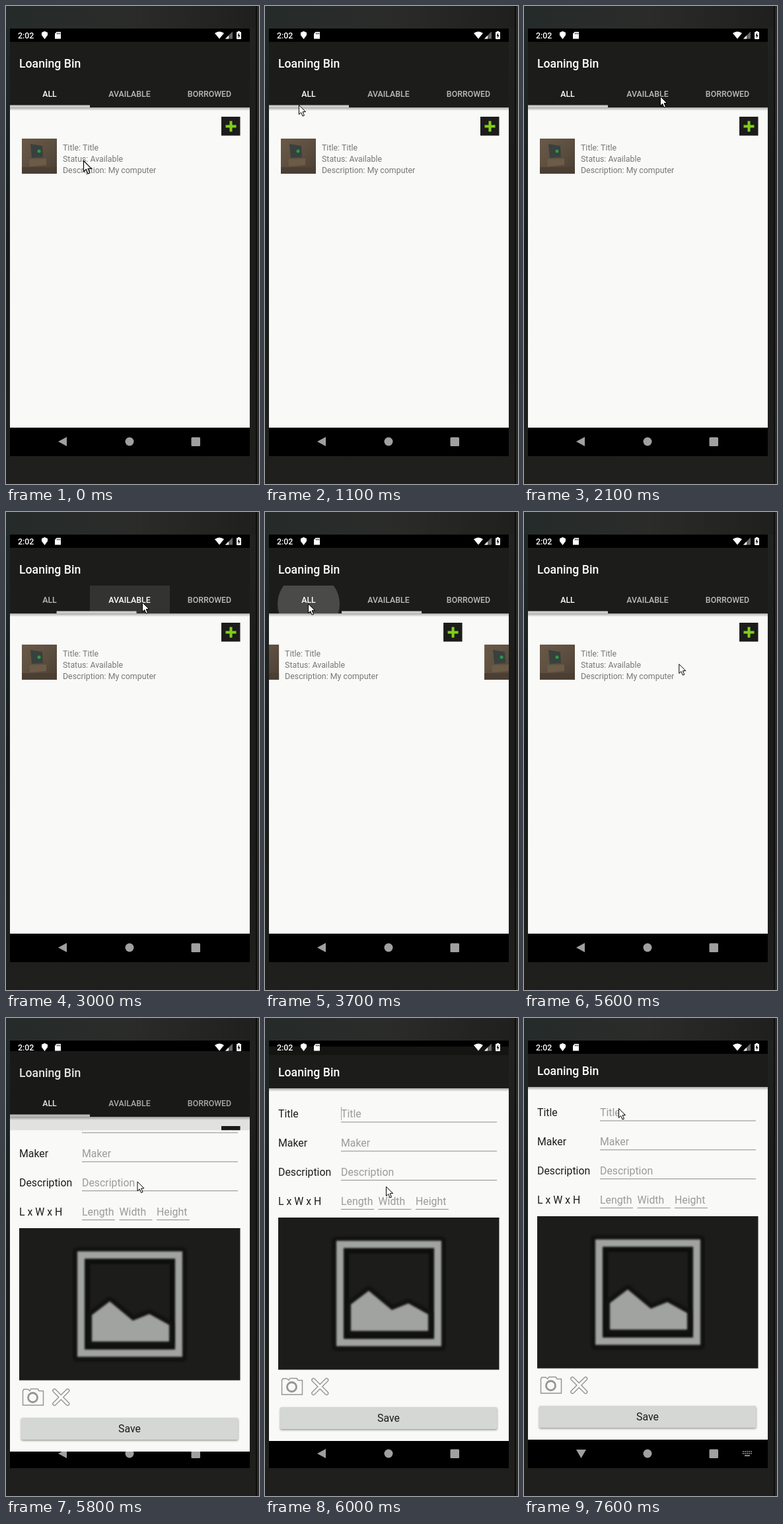
These frames come from a looping animation (383 by 721 pixels, 8 s). An HTML page with a canvas:

```html
<!DOCTYPE html>
<html lang="en">
<head>
<meta charset="utf-8">
<title>Item lending demo</title>
<style>
html, body { margin: 0; width: 100%; height: 100%; overflow: hidden; background: #1e1f1d; }
canvas { display: block; }
</style>
</head>
<body>
<canvas id="stage" width="383" height="721"></canvas>
<script>
const ctx = document.getElementById('stage').getContext('2d');
const LOOP = 8000, STEP = 100, PAGE = 364, TAB = 121;
const TAP_AVAILABLE = 2700, TAP_ALL = 3600, FORM_OPENS = 5630;
const DARK = '#1c1c1a', PAPER = '#f9f9f7', GREY = '#a1a3a1', LINE = '#969694';

const unit = v => Math.min(1, Math.max(0, v));
const smooth = s => s * s * (3 - 2 * s);
const quintOut = s => 1 - (1 - s) ** 5;
const mix = (a, b, k) => a + (b - a) * k;

// Pointer strokes: start, end, x, y, sideways bow
const STROKES = [
  [400, 1300, 63, 126, .8], [1300, 1400, 59, 102], [1500, 2000, 225, 141], [2000, 2100, 206, 136],
  [3000, 3400, 65, 138], [3800, 4500, 342, 188], [4900, 5000, 306, 194],
  [5100, 6000, 183, 254], [6000, 6700, 138, 145], [6900, 7000, 143, 136]
];
function pointerAt(t) {
  let x = 117, y = 233;
  for (const [start, end, tx, ty, bow = 0] of STROKES) {
    const k = smooth(unit((t - start) / (end - start))), push = 2 * k * (1 - k) * bow;
    [x, y] = [mix(x, tx, k) + (ty - y) * push, mix(y, ty, k) - (tx - x) * push];
    if (t < end) break;
  }
  return [x, y];
}

// 0 on the first tab, 1 on the second
const tabProgress = (t, ease, time) =>
  ease(unit((t - TAP_AVAILABLE) / time)) - ease(unit((t - TAP_ALL) / time));

function rect(x, y, w, h, fill) { ctx.fillStyle = fill; ctx.fillRect(x, y, w, h); }
function poly(points, fill) {
  ctx.beginPath();
  points.forEach(([x, y]) => ctx.lineTo(x, y));
  ctx.closePath();
  if (fill) { ctx.fillStyle = fill; ctx.fill(); }
}
function round(x, y, w, h, r, fill) {
  ctx.beginPath();
  ctx.roundRect(x, y, w, h, r);
  ctx.fillStyle = fill;
  ctx.fill();
}
function disc(x, y, r, fill) {
  ctx.beginPath();
  ctx.arc(x, y, r, 0, 7);
  ctx.fillStyle = fill;
  ctx.fill();
}
function text(s, x, y, size, fill, weight = 400, align = 'left') {
  ctx.font = `${weight} ${size}px Roboto, sans-serif`;
  ctx.textAlign = align;
  ctx.fillStyle = fill;
  ctx.fillText(s, x, y);
}
function fade(x0, y0, x1, y1, ...colors) {
  const g = ctx.createLinearGradient(x0, y0, x1, y1);
  colors.forEach((c, i) => g.addColorStop(i / (colors.length - 1), c));
  return g;
}
function clipped(x, y, w, h, draw) {
  ctx.save();
  ctx.beginPath();
  ctx.rect(x, y, w, h);
  ctx.clip();
  draw();
  ctx.restore();
}
function appBar(height, titleY) {
  const y = 54 + height;
  rect(6, 54, 363, height, DARK);
  rect(6, y, 363, 5, fade(0, y, 0, y + 5, 'rgba(0,0,0,.32)', 'rgba(0,0,0,0)'));
  text('Loaning Bin', 20, titleY, 17.66, '#fff', 500);
}

function backdrop() {
  rect(0, 0, 383, 721, fade(0, 0, 0, 721, '#222422', '#1c1d1b', '#1c1c1a', '#1f201d'));
  rect(0, 0, 383, 34, fade(0, 0, 383, 0, '#252b2a', '#2b2c2a', '#1f201e'));
  rect(0, 34, 6, 645, fade(0, 34, 0, 679, '#20292a', '#171b1b', '#1d201e'));
  rect(378, 0, 2, 721, '#0e0e0d');
  rect(380, 0, 3, 721, '#2a2b28');
  rect(6, 34, 363, 645, '#000');
}

function statusBar() {
  text('2:02', 18, 49, 12.36, '#fff', 500);
  poly([[58.5, 38], [63, 40], [63, 44], [58.5, 50], [54, 44], [54, 40]], '#fff');
  poly([[76.5, 39], [83, 39], [83, 49.5], [74, 49.5], [74, 42]], '#fff');
  for (let x = 77; x < 82; x += 2) rect(x, 40.5, 1, 2, '#000');
  ctx.beginPath();
  ctx.moveTo(323, 49.5);
  ctx.lineTo(316, 41);
  ctx.quadraticCurveTo(323, 36, 330, 41);
  ctx.fillStyle = '#fff';
  ctx.fill();
  poly([[343, 38.5], [343, 49.5], [332, 49.5]], '#666');
  poly([[337, 44.5], [337, 49.5], [332, 49.5]], '#fff');
  round(349, 39, 7, 11, 1, '#fff');
  rect(351, 38, 3, 1, '#fff');
  poly([[353, 40.5], [350.5, 45], [352, 45], [352, 48.5], [354.5, 44], [353, 44]], '#000');
}

function navBar(keyboard) {
  const c = '#a0a0a0';
  poly(keyboard ? [[79, 651], [94, 651], [86.5, 664]] : [[79, 657], [92, 650], [92, 664]], c);
  disc(187, 657, 6.5, c);
  round(280.5, 650.5, 13.5, 13.5, 1.5, c);
  if (!keyboard) return;
  for (let i = 0; i < 10; i++) rect(331 + i % 5 * 3, 653 + (i > 4) * 3, 1.7, 1.7, c);
  rect(334, 659.3, 8, 1.7, c);
}

function photo() {
  rect(24, 200, 53, 53, fade(24, 200, 77, 253, '#6a5947', '#5d4f40', '#4a3e33'));
  rect(24, 243, 53, 10, '#4b3e33');
  poly([[37, 208], [55, 211], [56, 228], [39, 229]], '#38413d');
  disc(50, 219, 2.5, '#2c9a48');
  poly([[35, 231], [61, 230], [61, 240], [36, 242]], '#6b5b47');
}

function listPage(x) {
  ctx.save();
  ctx.translate(x, 0);
  rect(326, 167, 28.5, 28.5, DARK);
  rect(332.5, 179.5, 16, 4, '#82cd1c');
  rect(338.5, 173.5, 4, 16, '#82cd1c');
  photo();
  ['Title: Title', 'Status: Available', 'Description: My computer']
    .forEach((s, i) => text(s, 86, 218 + i * 17, 12.36, '#777775'));
  ctx.restore();
}

function ripple(age, tab) {
  if (age < STEP || age > 400) return;
  ctx.globalAlpha = 1 - (age - STEP) / 400;
  clipped(6 + tab * TAB, 111, TAB, 42, () => disc(66 + tab * TAB, 139, 27 + age * .2, '#4a4a48'));
  ctx.globalAlpha = 1;
}

function listScreen(t) {
  const scroll = PAGE * tabProgress(t, quintOut, 320);
  const chosen = t > TAP_AVAILABLE && t <= TAP_ALL ? 1 : 0;
  rect(6, 153, 363, 483, PAPER);
  listPage(-scroll);
  listPage(PAGE - scroll);
  appBar(99, 93);
  ripple(t - TAP_AVAILABLE, 1);
  ripple(t - TAP_ALL, 0);
  ['ALL', 'AVAILABLE', 'BORROWED'].forEach((s, i) =>
    text(s, 66 + i * TAB, 137, 12.36, i === chosen ? '#fff' : '#bbbbb9', 500, 'center'));
  rect(6 + TAB * tabProgress(t, smooth, 540), 149.5, TAB, 3.5, '#cdcdcb');
}

function placeholder() {
  rect(20, 299, 334.5, 229.5, DARK);
  ctx.save();
  ctx.filter = 'blur(1.5px)';
  round(101, 327.5, 173, 173, 7, '#121210');
  rect(108, 334, 159, 159, GREY);
  rect(119, 345, 137, 137, '#0e0e0c');
  rect(127, 353, 121, 121, DARK);
  poly([[130, 430], [157, 409.5], [192, 438.5], [217, 428.5], [247, 445], [247, 470], [130, 470]]);
  ctx.lineJoin = 'round';
  ctx.lineWidth = 14;
  ctx.strokeStyle = '#121210';
  ctx.stroke();
  ctx.fillStyle = GREY;
  ctx.fill();
  ctx.restore();
}

function stroke(width, color) {
  ctx.lineWidth = width;
  ctx.strokeStyle = color;
  ctx.stroke();
}

function formIcons() {
  ctx.lineJoin = ctx.lineCap = 'round';
  poly([[25.5, 544.5], [27, 542], [33, 542], [36, 544.5], [37.5, 541.5],
    [48, 541.5], [50, 544.5], [56.5, 544.5], [56.5, 566], [25.5, 566]]);
  stroke(1.5, LINE);
  ctx.beginPath();
  ctx.arc(40.5, 554.5, 7, 0, 7);
  stroke(2.8, LINE);
  ctx.beginPath();
  for (const side of [-10, 10]) {
    ctx.moveTo(83.3 - side, 544);
    ctx.lineTo(83.3 + side, 564);
  }
  stroke(6.2, LINE);
  stroke(3.4, PAPER);
}

function field(hint, x, w, y) {
  text(hint, x, Math.round(y), 15.85, '#9b9b99');
  rect(x, y + 6.5, w, 1, '#8c8c8a');
}

function formScreen(caret) {
  rect(6, 104, 363, 532, PAPER);
  appBar(50, 86);
  ['Title', 'Maker', 'Description', 'L x W x H'].forEach((s, i) => {
    const y = 148 + i * 43.85;
    text(s, 20, Math.round(y), 15.85, DARK);
    if (i < 3) field(s, 115, 236, y);
    else ['Length', 'Width', 'Height'].forEach((hint, j) => field(hint, 115 + j * 56.5, 50, y));
  });
  if (caret) rect(115, 132, 1, 20, '#a8a8a6');
  placeholder();
  formIcons();
  ctx.save();
  ctx.shadowColor = 'rgba(0,0,0,.4)';
  ctx.shadowBlur = 3;
  ctx.shadowOffsetY = 1.5;
  round(23, 585, 328.5, 33, 2, '#d5d7d4');
  ctx.restore();
  text('Save', 187, 607, 15.85, DARK, 400, 'center');
}

function pointer(t) {
  const [x, y] = pointerAt(t), size = t < STEP ? 1.17 : 1;
  ctx.save();
  ctx.translate(x + .5, y + .5);
  ctx.scale(size, size);
  poly([[0, 0], [0, 14], [3.2, 11], [5.6, 16.6], [8, 15.6], [5.6, 10.2], [10, 10]], '#fff');
  ctx.lineJoin = 'miter';
  stroke(1, '#000');
  ctx.restore();
}

function draw(t) {
  const opening = unit((t - FORM_OPENS) / 440), eased = smooth(opening);
  backdrop();
  navBar(t >= 7600);
  if (opening < 1) {
    ctx.save();
    ctx.translate(0, Math.round(-12 * eased));
    clipped(6, 54, 363, 582, () => {
      listScreen(t);
      rect(6, 54, 363, 582, `rgba(0,0,0,${.3 * eased})`);
    });
    ctx.restore();
  }
  if (opening > 0) {
    // The form rises slightly while it is uncovered from the bottom up.
    const top = mix(679, 34, 1 - (1 - opening) ** 3.2);
    const caret = t < 7600 && Math.floor((t - 5700) / 500) % 2 === 0;
    clipped(6, top, 363, 679 - top, () => {
      ctx.translate(0, Math.round(26.4 * (1 - eased)));
      formScreen(caret);
    });
  }
  statusBar();
  pointer(t);
}

function tick() {
  const t = performance.now() % LOOP;
  draw(Math.floor(t / STEP) * STEP);
  requestAnimationFrame(tick);
}
tick();
</script>
</body>
</html>
```
